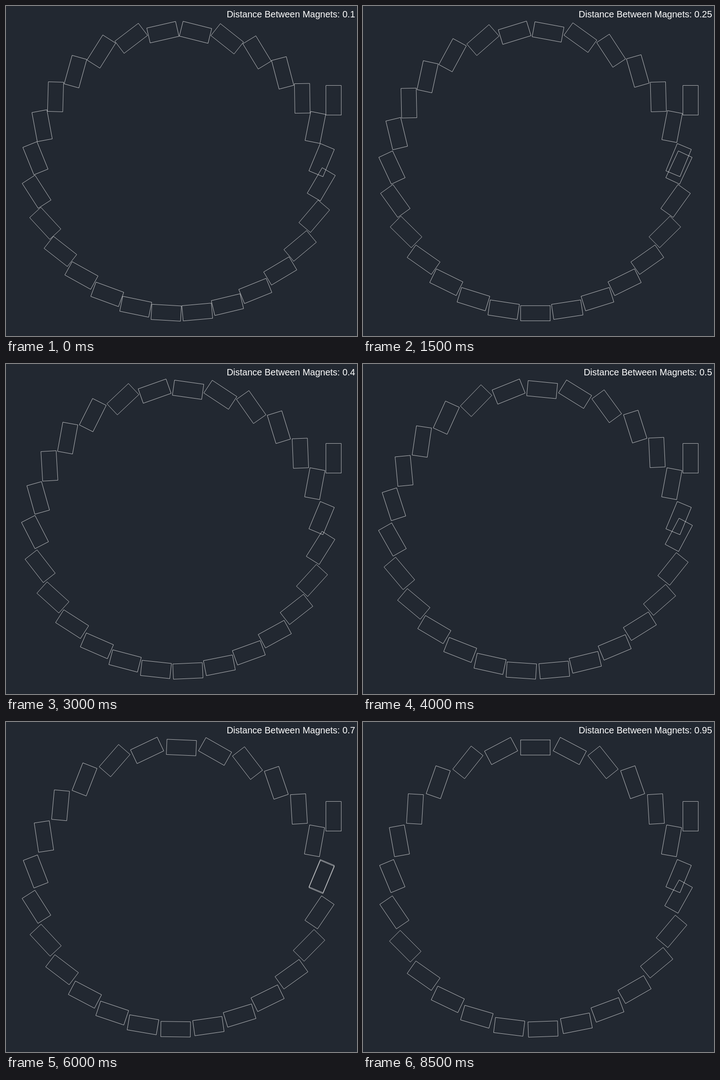
An HTML page that plays this animation: 772 px wide and 725 px high, repeating every 9 s.

```html
<!DOCTYPE html>
<html lang="en">
<head>
<meta charset="utf-8">
<title>Magnet spacing</title>
<style>
  html, body { margin: 0; width: 100%; height: 100%; overflow: hidden; background: #222831; }
  svg { display: block; width: 772px; height: 725px; }
  rect { fill: none; stroke: #fff; stroke-width: 0.65; }
  text { fill: #fff; font: 20px "Liberation Sans", Arial, sans-serif; text-anchor: end; }
</style>
</head>
<body>
<svg viewBox="0 0 772 725">
  <g id="magnets"></g>
  <text id="label" x="767.8" y="24.8"></text>
</svg>
<script>
const STEP_MS = 500, STEPS = 18;
const HALF_W = 16.75, HALF_H = 32.5;
const UNIT = 6.3;
const RING = { x: 379.3, y: 365.5, r: 379.5 };
const PIVOT = { x: 379.3, y: 207.2 };
const INSET = 70;
const RING_POINTS = 1000;

// A magnet sits inside the ring, on the line from a ring point to the pivot.
function place(index) {
  const t = index / RING_POINTS * 2 * Math.PI;
  const x = RING.x + RING.r * Math.cos(t);
  const y = RING.y - RING.r * Math.sin(t);
  const turn = Math.atan2(y - PIVOT.y, x - PIVOT.x);
  return { x: x - INSET * Math.cos(turn), y: y - INSET * Math.sin(turn), turn };
}

function rotate(x, y, angle) {
  const c = Math.cos(angle), s = Math.sin(angle);
  return [x * c - y * s, x * s + y * c];
}

// Smallest signed distance from the corners of one magnet to the other.
function cornerDistance(from, to) {
  let least = Infinity;
  for (const sx of [-1, 1]) {
    for (const sy of [-1, 1]) {
      const [cx, cy] = rotate(sx * HALF_W, sy * HALF_H, from.turn);
      const [lx, ly] = rotate(from.x + cx - to.x, from.y + cy - to.y, -to.turn);
      const dx = Math.abs(lx) - HALF_W, dy = Math.abs(ly) - HALF_H;
      const outside = Math.hypot(Math.max(dx, 0), Math.max(dy, 0));
      least = Math.min(least, outside + Math.min(Math.max(dx, dy), 0));
    }
  }
  return least;
}

const distance = (a, b) => Math.min(cornerDistance(a, b), cornerDistance(b, a));

// Walks around the ring, adding a magnet whenever the gap is wide enough.
function arrange(gap) {
  const places = [place(0)];
  for (let i = 1; i < RING_POINTS; i++) {
    const next = place(i);
    if (distance(places[places.length - 1], next) >= gap * UNIT) places.push(next);
  }
  return places;
}

const group = document.getElementById("magnets");
const label = document.getElementById("label");

function addMagnet() {
  const rect = document.createElementNS("http://www.w3.org/2000/svg", "rect");
  const box = { x: -HALF_W, y: -HALF_H, width: 2 * HALF_W, height: 2 * HALF_H };
  for (const name in box) rect.setAttribute(name, box[name]);
  group.append(rect);
  return rect;
}

function setPlace(rect, { x, y, turn }) {
  rect.setAttribute("transform", `translate(${x} ${y}) rotate(${turn * 180 / Math.PI})`);
}

const gaps = Array.from({ length: STEPS }, (_, i) => +(0.1 + 0.05 * i).toFixed(2));
const poses = gaps.map(arrange);

// The first magnet is also shown before it is turned around the pivot.
const reach = Math.hypot(RING.r, RING.y - PIVOT.y) - INSET;
setPlace(addMagnet(), { x: PIVOT.x + reach, y: PIVOT.y, turn: 0 });
const magnets = Array.from({ length: Math.max(...poses.map(p => p.length)) }, addMagnet);

let shown = -1;
function draw() {
  const step = Math.floor(performance.now() / STEP_MS) % STEPS;
  if (step !== shown) {
    shown = step;
    label.textContent = "Distance Between Magnets: " + gaps[step];
    magnets.forEach((rect, i) => {
      const spot = poses[step][i];
      rect.style.display = spot ? "" : "none";
      if (spot) setPlace(rect, spot);
    });
  }
  requestAnimationFrame(draw);
}
draw();
</script>
</body>
</html>
```
